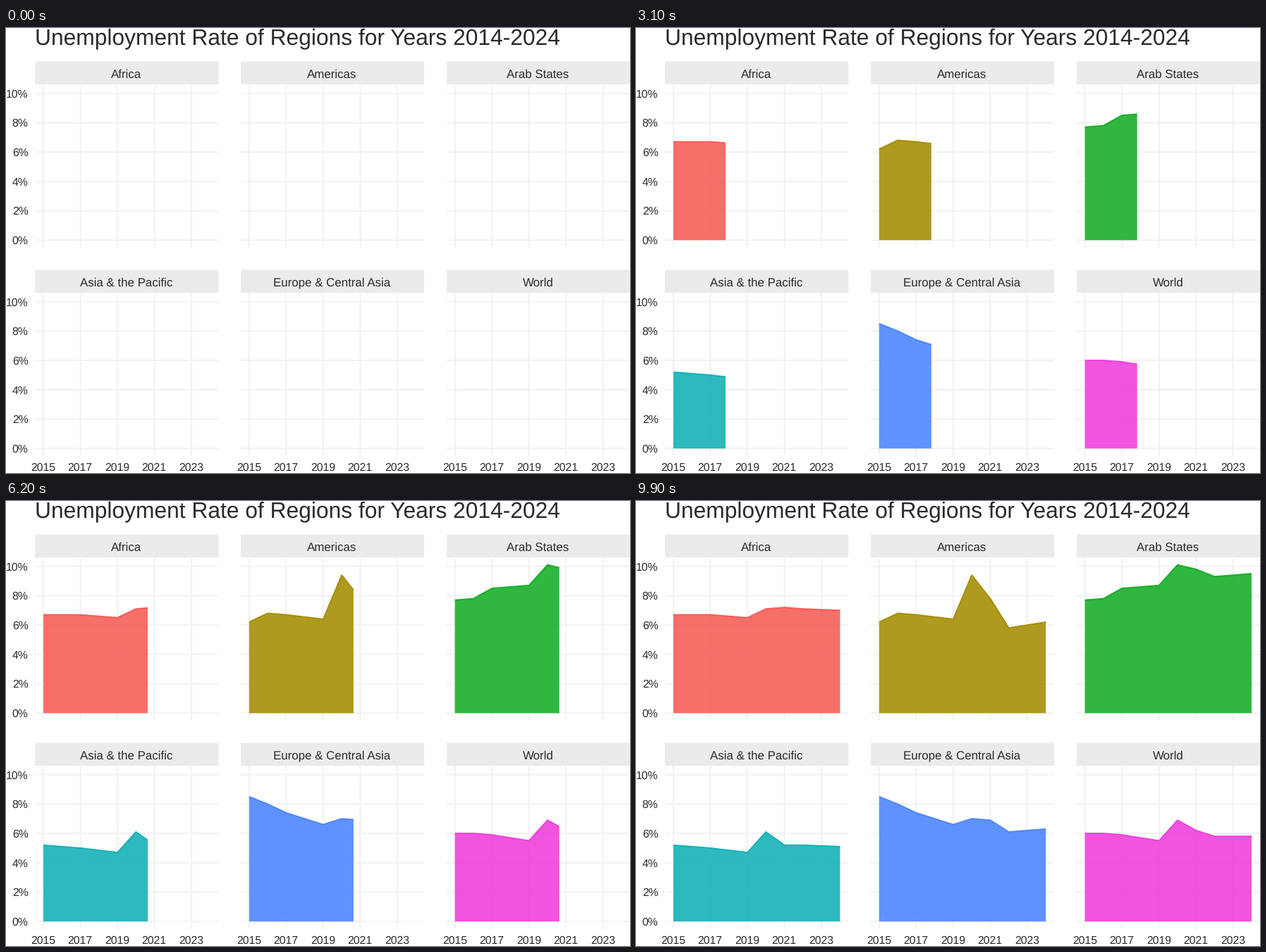
A matplotlib script that plays this animation: 885x632 px, repeating every 10000 ms.

```python
import numpy as np
import matplotlib.pyplot as plt
from matplotlib.animation import FuncAnimation
from matplotlib.patches import Polygon, Rectangle

plt.rcParams["font.family"] = "Liberation Sans"
plt.rcParams["text.hinting"] = "none"
plt.rcParams["path.snap"] = False

W, H, DPI = 885, 632, 64
PT = 72 / DPI                     # points per pixel
FRAMES, INTERVAL = 100, 100
STEPS = 11                        # frames per year

LEFT, TOP = 41.15, 80.2
PANEL_W, PANEL_H, STRIP_H = 260.1, 231.6, 32.6
COL_STEP, ROW_STEP = 291.85, 295.9
YEAR = PANEL_W / 9.9              # pixels per year
PERCENT = PANEL_H / 11.11         # pixels per percentage point
INK, GRID, STRIP = "#2a2a2a", "#f1f1f1", "#ebebeb"

# Rates at the turning points, in years after 2015; straight lines between.
TURNS = (0, 1, 2, 4, 5, 6, 7, 9)
REGIONS = [
    ("Africa", "#f65f59", (6.7, 6.7, 6.7, 6.5, 7.1, 7.2, 7.1, 7.0)),
    ("Americas", "#a78f07", (6.2, 6.8, 6.7, 6.4, 9.4, 7.8, 5.8, 6.2)),
    ("Arab States", "#19b02b", (7.7, 7.8, 8.5, 8.7, 10.1, 9.8, 9.3, 9.5)),
    ("Asia & the Pacific", "#16b2b6", (5.2, 5.1, 5.0, 4.7, 6.1, 5.2, 5.2, 5.1)),
    ("Europe & Central Asia", "#4f86ff", (8.5, 8.0, 7.4, 6.6, 7.0, 6.9, 6.1, 6.3)),
    ("World", "#f041db", (6.0, 6.0, 5.9, 5.5, 6.9, 6.2, 5.8, 5.8)),
]

fig = plt.figure(figsize=(W / DPI, H / DPI), dpi=DPI, facecolor="white")
ax = fig.add_axes([0, 0, 1, 1])
ax.set_xlim(0, W)
ax.set_ylim(H, 0)
ax.axis("off")


def label(x, y, text, size, ha="center"):
    ax.text(x, y, text, fontsize=size * PT, color=INK, ha=ha, va="baseline")


def line(xs, ys, color, z):
    return ax.plot(xs, ys, color=color, lw=2 * PT, zorder=z,
                   solid_capstyle="butt", solid_joinstyle="round")[0]


class Panel:
    def __init__(self, index, name, color, rates):
        row, col = divmod(index, 3)
        left, top = LEFT + col * COL_STEP, TOP + row * ROW_STEP
        self.x0 = left + 0.45 * YEAR
        self.y0 = top + PANEL_H - 0.505 * PERCENT
        self.rates = rates

        ax.add_patch(Rectangle((left, top - STRIP_H), PANEL_W, STRIP_H,
                               fc=STRIP, ec="none"))
        label(left + PANEL_W / 2 - 0.5, top - 9.7, name, 16.9)
        for pct in range(0, 11, 2):
            y = self.y0 - pct * PERCENT
            line([left, left + PANEL_W], [y, y], GRID, 1)
            if col == 0:
                label(31.5, y + 5.7, f"{pct}%", 15.8, "right")
        for year in range(0, 9, 2):
            x = self.x0 + year * YEAR
            line([x, x], [top, top + PANEL_H], GRID, 1)
            if row == 1:
                label(x - 0.4, top + PANEL_H + 21.5, str(2015 + year), 15.8)

        self.area = ax.add_patch(Polygon([(0, 0)] * 3, fc=color, ec="none",
                                         alpha=0.9, zorder=2))
        self.edge = line([], [], color, 3)

    def reveal(self, t):
        shown = np.array([turn for turn in TURNS if turn < t] + [t])
        x = self.x0 + shown * YEAR
        y = self.y0 - np.interp(shown, TURNS, self.rates) * PERCENT
        self.edge.set_data(x, y)
        self.area.set_xy([(x[0], self.y0), *zip(x, y), (x[-1], self.y0)])
        for part in (self.area, self.edge):
            part.set_visible(t > 0)


label(40.7, 23.3, "Unemployment Rate of Regions for Years 2014-2024", 31.7, "left")
panels = [Panel(i, *region) for i, region in enumerate(REGIONS)]


def update(frame):
    for panel in panels:
        panel.reveal(frame / STEPS)
    return [part for p in panels for part in (p.area, p.edge)]


anim = FuncAnimation(fig, update, frames=FRAMES, interval=INTERVAL,
                     init_func=lambda: update(0), repeat=True, repeat_delay=0)
plt.show()
```
